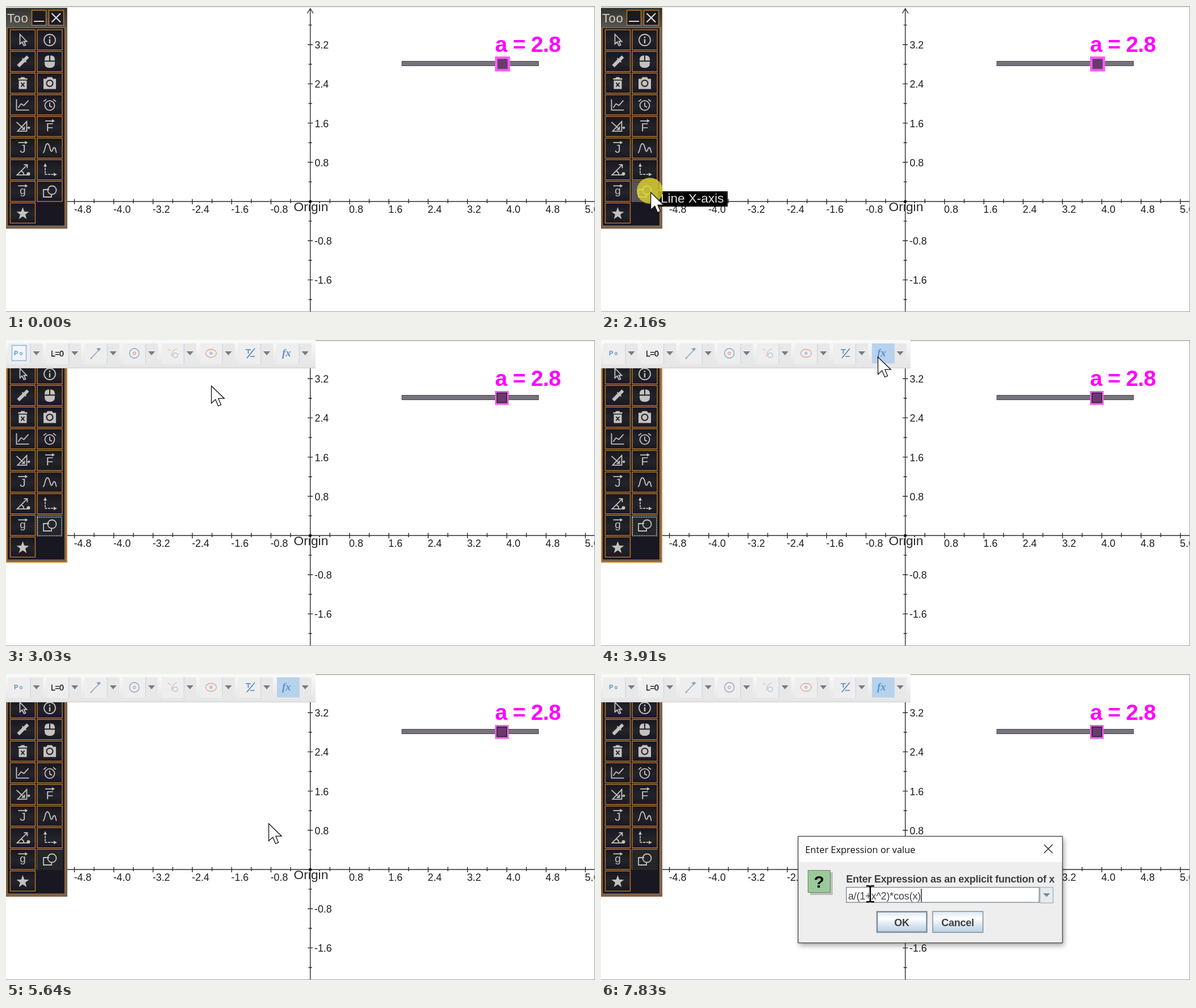
An HTML page that plays this animation: 1037 by 540 pixels, repeating every 8000 ms.

```html
<!DOCTYPE html>
<html lang="en">
<head>
<meta charset="utf-8">
<title>Plotting tool</title>
<style>
html, body { margin: 0; width: 100%; height: 100%; overflow: hidden; background: #fff; }
svg { display: block; width: 1037px; height: 540px; font-family: "Liberation Sans", Arial, sans-serif; }
text { white-space: pre; }
.ui { font-family: "Open Sans", "Noto Sans", sans-serif; }
.ico { fill: none; stroke: #c4c1be; stroke-width: 1.8; }
.ico .f, .ico text { fill: #c4c1be; stroke: none; }
.ico .d { fill: #201f28; stroke: none; }
.bold { font-weight: 700; font-size: 18px; letter-spacing: -.27px; fill: #404040; }
</style>
</head>
<body>
<svg id="stage" viewBox="0 0 1037 540" xmlns="http://www.w3.org/2000/svg">
  <defs>
    <linearGradient id="key" x2="0" y2="1"><stop stop-color="#181620"/><stop offset=".55" stop-color="#23242a"/><stop offset="1" stop-color="#191722"/></linearGradient>
    <linearGradient id="title" x2="0" y2="1"><stop stop-color="#33322f"/><stop offset="1" stop-color="#5a5651"/></linearGradient>
    <linearGradient id="strip" x2="0" y2="1"><stop stop-color="#fafafa"/><stop offset="1" stop-color="#e4e4e4"/></linearGradient>
    <linearGradient id="metal" x2="0" y2="1"><stop stop-color="#dde8f3"/><stop offset=".35" stop-color="#fff"/><stop offset=".5" stop-color="#eaf1f8"/><stop offset="1" stop-color="#b8cfe5"/></linearGradient>
  </defs>

  <g id="plot"></g>
  <path d="M0 1H1037" stroke="#a9a9a9" stroke-width="1.5"/>
  <path d="M1036.5 0V540M0 539.5H1037" stroke="#a2a2a2"/>

  <rect x="697" y="97.5" width="240.5" height="8" fill="#77727b" stroke="#4b474e"/>
  <g id="knobIdle">
    <rect x="861" y="89" width="26.5" height="26.5" fill="#fb5cf7"/>
    <rect x="865.5" y="93.5" width="17.5" height="17.5" fill="#693b6d" stroke="#93429a"/>
  </g>
  <g id="knobSet">
    <rect x="861" y="90" width="24" height="24.5" fill="#f05cec"/>
    <rect x="864.5" y="93.5" width="17" height="17" fill="#693b6d" stroke="#2c1830" stroke-width="1.4"/>
  </g>
  <text x="861" y="80.5" font-size="39" font-weight="700" letter-spacing="-.7" fill="#f0f">a = 2.8</text>

  <g id="panel">
    <rect y="3" width="108" height="390" fill="#70655b"/>
    <rect y="4" width="107" height="34" fill="url(#title)"/>
    <text x="2" y="29" font-size="22" letter-spacing=".6" fill="#d5d0ca">Too</text>
    <rect x="45.500" y="7.500" width="25" height="26.500" fill="#1b1a24" stroke="#b9772e" stroke-width="1.5"/>
    <rect x="75.500" y="7.500" width="26" height="26.500" fill="#1b1a24" stroke="#b9772e" stroke-width="1.5"/>
    <path d="M49 27H67M80.500 13L96 28.500M96 13L80.500 28.500" stroke="#dedad6" stroke-width="2.200"/>
    <rect x="2.500" y="38.500" width="101" height="349.500" fill="#191722" stroke="#a56c30" stroke-width="1.2"/>
    <path d="M.5 38V392.500H107.500V3" fill="none" stroke="#86603a"/>
    <path id="glow" d="M.5 38V392H107.200V3" fill="none" stroke="#e0963a" stroke-width="1.7"/>
    <g id="keys"></g>
    <rect id="geoKey" x="55" y="310" width="45" height="36" fill="#23262a"/>
    <rect id="geoHot" x="55" y="311" width="44" height="35" fill="#56545a"/>
    <rect id="geoDot" x="55.500" y="312.500" width="42.500" height="33" fill="none" stroke="#eee" stroke-width="1.4" stroke-dasharray="1.5 1.5"/>
    <g class="ico" transform="translate(77 328)"><path d="M-1 -4H-11V9H3V5"/><circle cx="4" cy="-3" r="7.500"/></g>
  </g>

  <g id="bar">
    <rect width="545" height="50" fill="url(#strip)"/>
    <path d="M0 49.500H545" stroke="#cfcfcf"/>
    <g id="tools"></g>
    <rect id="pSel" x="10.500" y="9.500" width="25" height="27" fill="#f2f6fb" stroke="#8db2dc" stroke-width="1.5"/>
    <rect id="fxSel" x="477" y="6" width="39.500" height="35.500" fill="#b7d2ec"/>
    <g fill="none" stroke="#7ba3c9" stroke-width="1.3">
      <text x="14" y="27" font-size="11" font-weight="700" fill="#5a8fc8" stroke="none">P</text><circle cx="26.500" cy="24" r="2"/>
      <text x="79" y="29" font-size="14" fill="#111" stroke="#111" stroke-width=".3" letter-spacing="-.5">L=0</text>
      <path d="M150 32L165 16"/><g fill="#e2a08c" stroke="none"><circle cx="150" cy="32" r="1.800"/><circle cx="165" cy="16" r="1.800"/></g>
      <path d="M166 14l-7 1 5 5z" fill="#7ba3c9" stroke="none"/>
      <circle cx="226" cy="23.500" r="8.500"/><circle cx="226" cy="23.500" r="2.200" stroke="#e2a08c"/>
      <path d="M285 16l5 3M292 29q-2-9 9-14" stroke="#e3b9ab"/><circle cx="298" cy="27" r="4.200" stroke="#a9c3da"/>
      <ellipse cx="361" cy="23.500" rx="9.500" ry="7" stroke="#e2a08c"/><circle cx="361" cy="23.500" r="1.800" stroke="#8aaed0"/>
      <path d="M422 17h9M426.500 17v7M424 32L438 15M430 29h8" stroke="#4f86c0" stroke-width="1.700"/>
      <text x="486" y="29" font-size="19" font-style="italic" font-family="Liberation Serif, serif" font-weight="700" fill="#5f93cf" stroke="none">fx</text>
    </g>
  </g>

  <g id="dialog">
    <g style="filter:drop-shadow(2px 4px 5px rgba(0,0,0,.36))"><rect x="347" y="287" width="466" height="188" fill="#eee"/></g>
    <rect x="347" y="287" width="466" height="45" fill="#fff"/>
    <rect x="347" y="286.500" width="465.500" height="188" fill="none" stroke="#4f4f4f" stroke-width="1.4"/>
    <text class="ui" x="359.500" y="316" font-size="16.400" fill="#111">Enter Expression or value</text>
    <path d="M780 301L795 316M795 301L780 316" stroke="#222" stroke-width="1.4"/>
    <rect x="368" y="350" width="40" height="40" fill="#bcbcbc"/>
    <rect x="364.500" y="346.500" width="39" height="39" fill="#9ac99a" stroke="#5f8a5f"/>
    <text x="384" y="377" font-size="30" font-weight="700" text-anchor="middle" fill="#000">?</text>
    <text class="bold" x="431.500" y="368">Enter Expression as an explicit function of x</text>
    <g stroke="#7a8a99" stroke-width="1.400">
      <rect x="432" y="376.500" width="339.500" height="26.500" fill="#fff"/>
      <rect x="773" y="376.500" width="23" height="27.500" fill="#e6ebf0" stroke="#a9b6c2"/>
      <rect x="486" y="419.500" width="87.500" height="36" fill="url(#metal)" stroke-width="2.400"/>
      <rect x="584" y="419" width="88.500" height="37" fill="url(#metal)"/>
    </g>
    <path d="M778.500 387H790.500L784.500 393.500Z" fill="#7c868f"/>
    <rect id="okFocus" x="516.500" y="425.500" width="26.500" height="24.500" fill="none" stroke="#94afcb" stroke-width="1.200"/>
    <text class="bold" x="529.500" y="444.500" text-anchor="middle">OK</text>
    <text class="bold" x="628" y="444.500" text-anchor="middle">Cancel</text>
    <path id="caret" d="M435.500 379V402" stroke="#333" stroke-width="1.600"/>
    <g id="typed"><text x="435" y="397.500" font-size="18" letter-spacing="-.18" fill="#444">a/(1+x^2)*cos(x)</text><path d="M564 379V402" stroke="#333" stroke-width="1.600"/></g>
    <path id="beam" d="M467 374H472L474 375.500L476 374H481M474 375V401M467 402H472L474 400.500L476 402H481" fill="none" stroke="#000" stroke-width="2.500"/>
  </g>

  <g id="axisTip">
    <rect width="120" height="27" fill="#000"/>
    <text x="2" y="20" font-size="22.500" fill="#dedede">Line X-axis</text>
  </g>
  <g id="geoTip">
    <rect x="103" y="341.500" width="104.500" height="36" fill="#746f6a" fill-opacity=".88" stroke="#b87c38" stroke-width="1.600"/>
    <text x="106" y="370" font-size="22.300" fill="#f3e6d2">Geometry</text>
  </g>
  <circle id="ring" cx="86" cy="326" r="23" fill="#e3d92c" fill-opacity=".76"/>
  <path id="arrow" d="M.6 1V31.500L7.800 25L12.600 36.500L17.600 34.300L12.900 23.200H23.300Z" fill="#fff" stroke="#111" stroke-width="1.300"/>
</svg>

<script>
const $ = id => document.getElementById(id);
const fill = (id, html) => { $(id).innerHTML = html; };

// Coordinate axes
const OX = 535.7, OY = 345, UNIT = 34.6;
function plot() {
  let line = `M0 ${OY}H1037M${OX} 4V540`, text = '';
  const head = `M530.500 13L${OX} 4.500L541 13`;
  const label = (x, y, n) => { text += `<text x="${x}" y="${y}">${(n * .4).toFixed(1)}</text>`; };
  for (let n = -15; n <= 14; n++) {
    if (!n) continue;
    const x = OX + n * UNIT, y = OY - n * UNIT, major = n % 2 === 0;
    line += `M${x} ${OY - 4.5}v${major ? 9.5 : 7.5}`;
    if (major) label(x - .8, 365, n);
    if (n > -6 && n < 10) {
      line += major ? `M${OX - 4.5} ${y}h9` : `M${OX - 3} ${y}h6`;
      if (major) label(n < 0 ? 543 : 543.5, y + 7, n);
    }
  }
  fill('plot', `<path d="${line}${head}" fill="none" stroke="#2b2b2b" stroke-width="1.400"/>
    <circle cx="${OX}" cy="${OY}" r="2.500"/><g font-size="17.800" fill="#1c1c1c">${text}</g>
    <text x="506.500" y="362" font-size="22.800" fill="#2b2b2b">Origin</text>`);
}

// Tool palette, left to right, top to bottom
const vec = (c, size = 21, y = 8) => `<text y="${y}" font-size="${size}" text-anchor="middle">${c}</text>
  <path d="M-8 -10H6"/><path class="f" d="M4 -13L9 -10L4 -7Z"/>`;
const star = Array.from({length: 10}, (_, i) => {
  const a = i * Math.PI / 5, r = i % 2 ? 4.7 : 11.5;
  return [r * Math.sin(a), 1 - r * Math.cos(a)].map(v => v.toFixed(1)).join(' ');
}).join('L');
const icons = [
  '<path d="M-5 -10V7L-1 3.500L2 10L5 9L2 2.500H7Z"/>',
  '<circle r="10"/><path d="M0 -1.500V6M0 -6V-3.500" stroke-width="2.400"/>',
  '<path d="M-8 8L3 -3" stroke-width="6"/><path d="M-1 -6L6 1" stroke-width="2"/><path d="M3 -3L9 -9" stroke-width="5.500"/>',
  '<path class="f" d="M-9 -2V-4Q-9 -11 -1 -11V-2ZM1 -2V-11Q9 -11 9 -4V-2ZM-9 0H9V3Q9 11 0 11Q-9 11 -9 3Z"/>',
  '<path class="f" d="M-8 -9H-4L-3 -11H3L4 -9H8V-6.500H-8ZM-7 -5H7V10H-7Z"/><path d="M-3 -1L3 6M3 -1L-3 6" stroke="#201f28"/>',
  '<path class="f" d="M-11 -8H-6L-4 -11H4L6 -8H11V10H-11Z"/><circle class="d" r="6.500"/><circle class="f" r="4.500"/>',
  '<path d="M-11 -10V9H11M-8 5L-3 -2L2 1L10 -8"/>',
  '<circle cy="1" r="8.500"/><path d="M0 -4V2L4 4M-11 -6L-6 -10M11 -6L6 -10"/>',
  '<path d="M-9 8H7V-9ZM-11 -8L2 4M3 0V5H-2M7 2H12M10 0L12 2L10 4"/>',
  vec('F'), vec('J'),
  '<path d="M-12 8C-8 8 -9 -8 -4 -8C1 -8 0 8 4 5C6 3 5 -1 8 -1C11 -1 10 6 12 8"/>',
  '<path d="M9 9H-10L7 -8M2 -9H8V-3M-3 2Q2 4 2 9"/><circle class="f" cx="10" cy="7" r="3"/>',
  '<path d="M-8 -9V8H9" stroke-dasharray="4 1.500"/><path class="f" d="M-11 -6L-8 -12L-5 -6ZM7 5L13 8L7 11Z"/>',
  vec('g', 19, 5),
  '',
  `<path class="f" d="M${star}Z"/>`
];
function keys() {
  fill('keys', icons.map((ico, i) => {
    const x = i % 2 ? 77 : 29.5, y = 60 + (i >> 1) * 38.2;
    return `<g transform="translate(${x} ${y.toFixed(1)})"><rect x="-22" y="-18" width="44" height="35.500"
      fill="url(#key)" stroke="#bd7a2e" stroke-width="1.400"/><g class="ico">${ico}</g></g>`;
  }).join(''));
}

function tools() {
  let s = '';
  for (let i = 0; i < 8; i++) {
    const x = 3.5 + i * 67.6;
    s += `<rect x="${x}" y="6" width="61" height="36" fill="#eee"/>
      <rect x="${x + 40}" y="6" width="21" height="36" fill="#e8e8e8"/>
      <path d="M${x + 39.5} 6V42" stroke="#bcd2e8"/>
      <path d="M${x + 44} 20h12l-6 7z" fill="#777c80"/>`;
  }
  fill('tools', s);
}

// Start time, pointer position (or none), visible parts, tooltip position
const bar = 'knobSet bar ', fx = bar + 'fxSel ', off = fx + 'geoKey ', dlg = off + 'dialog ';
const steps = [
  [0, null, 'knobIdle'],
  [840, [449, 442], 'knobIdle'],
  [1270, [248, 385], 'knobIdle'],
  [1710, [97, 343], 'knobIdle axisTip', [117, 343]],
  [2160, [87, 328], 'knobIdle axisTip geoHot ring', [103, 327]],
  [2590, [87, 328], bar + 'pSel glow geoHot geoDot geoTip'],
  [3030, [361, 80], bar + 'pSel glow geoKey geoDot'],
  [3440, [492, 14], bar + 'pSel glow geoKey geoDot'],
  [3910, [487, 29], fx + 'glow geoKey geoDot'],
  [4310, [470, 136], fx + 'glow geoKey geoDot'],
  [4760, [465, 261], fx + 'glow geoKey geoDot'],
  [5220, [462, 263], fx + 'glow geoKey geoDot'],
  [5640, [462, 263], off],
  [6100, [462, 267], dlg + 'okFocus'],
  [6520, [462, 365], dlg + 'okFocus'],
  [6950, null, dlg + 'beam caret'],
  [7370, null, dlg + 'beam'],
  [7830, null, dlg + 'beam typed']
];
const parts = [...new Set(steps.flatMap(s => s[2].trim().split(/\s+/)))];
const show = (id, on) => { $(id).style.display = on ? '' : 'none'; };
const place = (id, p) => $(id).setAttribute('transform', `translate(${p[0]} ${p[1]})`);

let last = null;
function draw() {
  const t = performance.now() % 8000;
  const step = steps.findLast(s => s[0] <= t);
  if (step !== last) {
    const [, pos, names, tip] = step, on = names.split(' ');
    parts.forEach(id => show(id, on.includes(id)));
    show('arrow', pos);
    if (pos) place('arrow', pos);
    if (tip) place('axisTip', tip);
    last = step;
  }
  requestAnimationFrame(draw);
}

plot();
keys();
tools();
draw();
</script>
</body>
</html>
```
